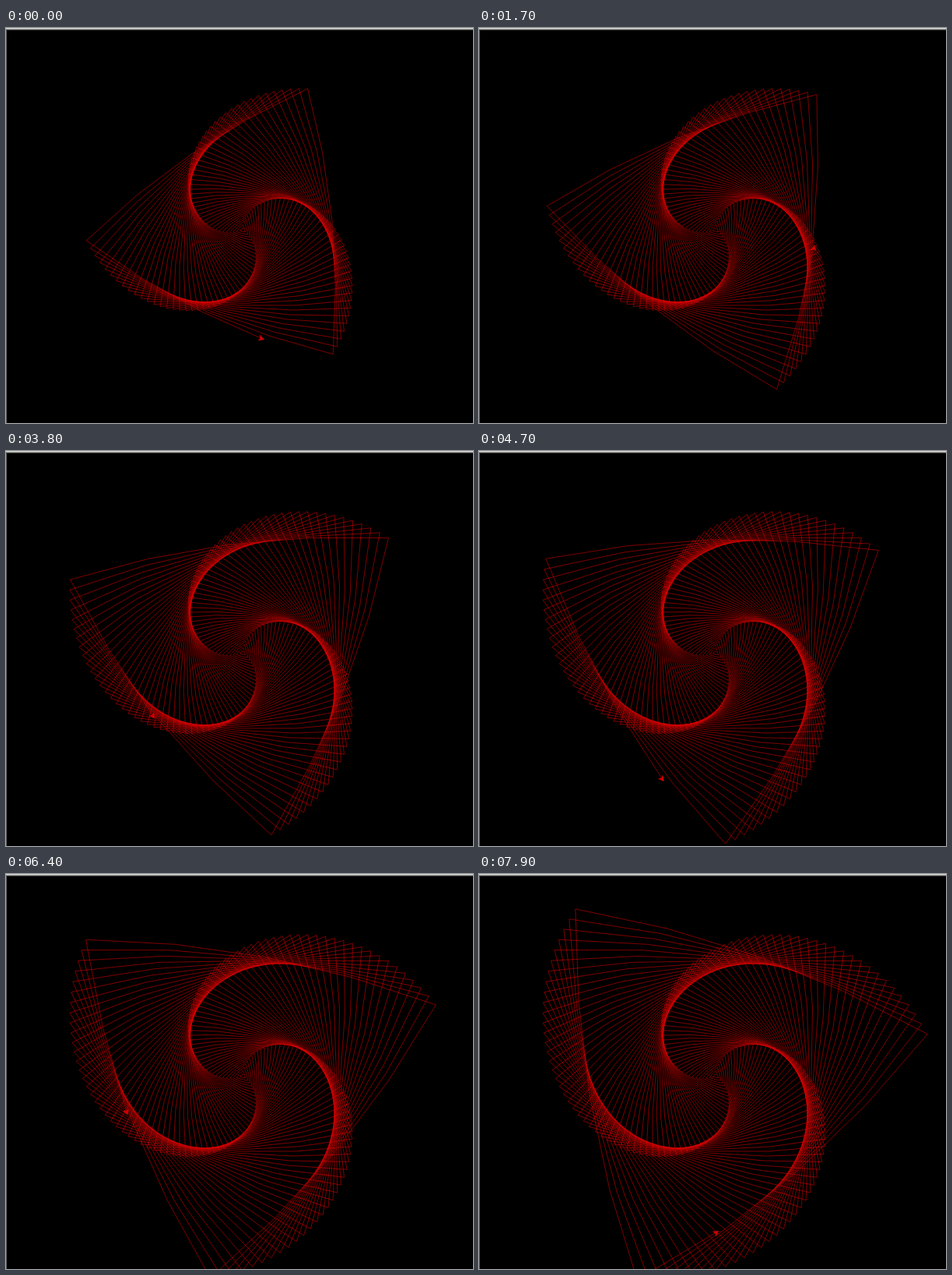
These frames come from a looping animation (600x507 px, 8 s). An HTML page with a canvas:

```html
<!DOCTYPE html>
<html lang="en">
<head>
<meta charset="utf-8">
<title>Turtle spiral</title>
<style>
  html, body { margin: 0; width: 100%; height: 100%; overflow: hidden; background: #000; }
  canvas { display: block; width: 600px; height: 507px; }
</style>
</head>
<body>
<canvas id="stage" width="600" height="507"></canvas>
<script>
const ctx = document.getElementById('stage').getContext('2d');
const RAD = Math.PI / 180;
const LOOP = 8000, TICK = 100;
const ARC = 20;          // degrees turned along one side
const TURN = 119;        // degrees between successive sides
const GROWTH = 2.5;      // chord length added per side
const SCALE = 0.72;
const SIDES = 195;
const RED = '#d40000';

// Drawing pace: [tick, quarter-sides drawn]
const PACE = [[0, 555.2], [17, 606.5], [25, 628.6], [38, 662.5],
              [57, 716.2], [71, 752.6], [79, 773.5]];

function progress(tick) {
  let i = 1;
  while (i < PACE.length - 1 && PACE[i][0] < tick) i++;
  const [t0, p0] = PACE[i - 1], [t1, p1] = PACE[i];
  return p0 + (p1 - p0) * (tick - t0) / (t1 - t0);
}

// Each side is an arc made of a few straight steps.
function buildSides() {
  const sides = [];
  let x = 304.4, y = 258.8;
  for (let n = 1; n <= SIDES; n++) {
    const steps = 1 + Math.floor(Math.min(11 + n / 0.6, 59) * ARC / 360);
    const bend = ARC / steps;
    const radius = GROWTH * n / (2 * Math.sin(ARC / 2 * RAD));
    const length = 2 * radius * Math.sin(bend / 2 * RAD);
    let heading = -7.55 + TURN * n - ARC / 2 + bend / 2;
    const points = [{ x, y, heading }];
    for (let s = 0; s < steps; s++) {
      x += length * Math.cos(heading * RAD);
      y -= length * Math.sin(heading * RAD);
      heading += s < steps - 1 ? bend : bend / 2;
      points.push({ x, y, heading });
    }
    sides.push(points);
  }
  return sides;
}

const sides = buildSides();

function strokeSide(points, count) {
  ctx.beginPath();
  for (let i = 0; i <= count; i++) ctx.lineTo(points[i].x, points[i].y);
  ctx.stroke();
}

function drawArrow({ x, y, heading }) {
  ctx.save();
  ctx.translate(x, y);
  ctx.rotate(-heading * RAD);
  ctx.scale(SCALE, SCALE);
  ctx.beginPath();
  ctx.moveTo(0, 0);
  ctx.lineTo(-9, 5);
  ctx.lineTo(-7, 0);
  ctx.lineTo(-9, -5);
  ctx.closePath();
  ctx.fill();
  ctx.stroke();
  ctx.restore();
}

function bar(color, x, y, w, h) {
  ctx.fillStyle = color;
  ctx.fillRect(x, y, w, h);
}

function draw(tick) {
  const pos = progress(tick);
  const done = Math.floor(pos);
  const side = Math.floor((done - 1) / 4);
  const step = done - side * 4;

  bar('#000', 0, 0, 600, 507);
  ctx.strokeStyle = ctx.fillStyle = RED;
  ctx.lineWidth = 0.6;
  for (let i = 0; i < side; i++) strokeSide(sides[i], sides[i].length - 1);
  strokeSide(sides[side], step);

  // The pointer blinks out while it turns at a corner.
  const turning = step === 4 && pos - done >= 0.5;
  if (!turning) drawArrow(sides[side][step]);

  bar('#666', 0, 0, 1, 507);
  bar('#d8d8d4', 0, 0, 600, 1);
  bar('#a0a0a0', 0, 1, 600, 1);
  bar('#444', 0, 2, 600, 1);
}

const start = performance.now();
let shown = -1;

function frame() {
  const tick = Math.floor((performance.now() - start) % LOOP / TICK);
  if (tick !== shown) draw(shown = tick);
  requestAnimationFrame(frame);
}
frame();
</script>
</body>
</html>
```
